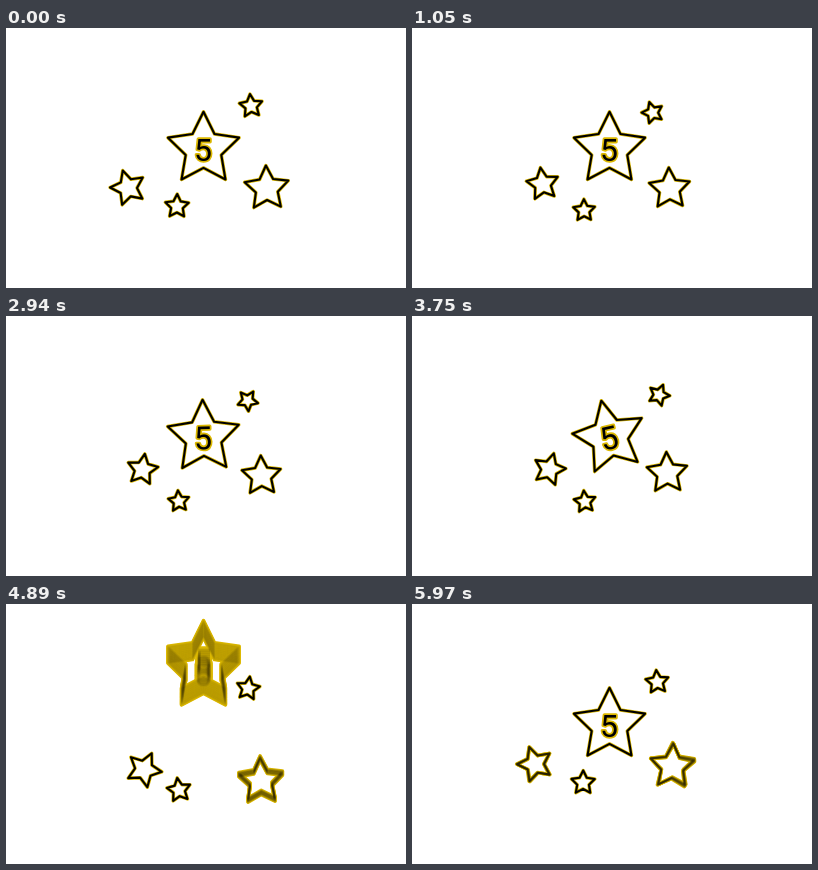
An HTML page with a canvas for the animation above (6 s loop, 400 px wide and 260 px high).

```html
<!DOCTYPE html>
<html>
<head>
<meta charset="utf-8">
<style>
html, body { margin: 0; width: 100%; height: 100%; overflow: hidden; background: #fff; }
canvas { display: block; }
</style>
</head>
<body>
<canvas id="stage" width="400" height="260"></canvas>
<script>
const ctx = document.getElementById('stage').getContext('2d');
const LOOP = 6000, SHUTTER = 30, GOLD = '#dcb800';
const JUMP = 4690, LANDED = 5700;
const { sin, cos, min, max, PI } = Math;

const clamp = u => max(0, min(1, u));
const smooth = u => u * u * (3 - 2 * u);
const progress = (t, from, length) => clamp((t - from) / length);

// Shared rhythms of the small stars
const settle = t => 1 - Math.exp(-t / 1400);
const wave = t => sin(3 * PI * t / LOOP) ** 2;
const homing = t => progress(t, 5040, 960) ** 2;
const swing = t => sin(2 * PI * progress(t, 1000, JUMP - 1000));

// drift: slow move away, sway: repeated swerve, drop: recoil from the jump,
// spin: steady turn, turn: extra turn on the way home
const smallStars = [
  { x: 245, y: 78, r: 12, rot: -5, drift: [3, 0], sway: [-6, 6.7], spin: -72 },
  { x: 122, y: 159.8, r: 18, rot: -17, drift: [16.5, -7], drop: 12.5, dropAt: 4500, spin: 52, turn: 20 },
  { x: 171, y: 178.3, r: 12.3, rot: 1, drift: [2, 8], spin: -11, turn: 11 },
  { x: 260.7, y: 160.5, r: 23, rot: -2, drift: [-6, 0], bob: 3.4, drop: 32, dropAt: 4738, turn: -72 }
];

function smallPose(star, t) {
  const { drift, sway = [0, 0], bob = 0, drop = 0, dropAt = 0, spin = 0, turn = 0 } = star;
  const home = homing(t), away = settle(t) * (1 - home);
  const fall = drop * smooth(progress(t, dropAt, 300)) * (1 - home);
  return {
    x: star.x + drift[0] * away + sway[0] * wave(t),
    y: star.y + drift[1] * away + sway[1] * wave(t) + bob * swing(t) + fall,
    r: star.r * (1 - 0.12 * max(0, sin(PI * t / 4890))),
    rot: star.rot + spin * t / LOOP + turn * home,
    scale: 1
  };
}

const bigStar = { x: 197.5, y: 121.2, r: 37.4, rot: 0, scale: 1 };

function jumpPose(t) {
  const up = max(0, (t - JUMP) / 200);
  const rot = 17 * progress(t, 1000, JUMP - 1000) * swing(t);
  return { ...bigStar, y: bigStar.y - 58 * up * up, rot };
}

function zoomPose(t) {
  const left = max(0, (LANDED - t) / 270);
  return { ...bigStar, rot: 7 * left - 29 * left * (1 - left), scale: 1 + 4.7 * left };
}

function starPath(r) {
  ctx.beginPath();
  for (let i = 0; i < 10; i++) {
    const a = (i / 5 - 0.5) * PI, d = i % 2 ? r * 0.5 : r;
    ctx.lineTo(d * cos(a), d * sin(a));
  }
  ctx.closePath();
}

function stroke(color, width) {
  ctx.strokeStyle = color;
  ctx.lineWidth = width;
  ctx.stroke();
}

// Sweeps a star over the shutter time: white body, gold rim, then thinned ink
function drawStar(pose, t, { body = false, label = false, ink = 1.3 } = {}) {
  const a = pose(t - SHUTTER / 2), b = pose(t + SHUTTER / 2);
  const travel = Math.hypot(b.x - a.x, b.y - a.y) +
    a.r * (Math.abs(b.scale - a.scale) + a.scale * Math.abs(b.rot - a.rot) * PI / 180);
  const n = travel < 1.3 ? 1 : min(40, Math.ceil(travel * 1.5));
  const pass = paint => {
    for (let i = 0; i < n; i++) {
      const p = pose(t + ((i + 0.5) / n - 0.5) * SHUTTER);
      ctx.save();
      ctx.translate(p.x, p.y);
      ctx.rotate(p.rot * PI / 180);
      ctx.scale(p.scale, p.scale);
      starPath(p.r);
      paint();
      ctx.restore();
    }
  };
  if (body) pass(() => { ctx.fillStyle = '#fff'; ctx.fill(); });
  pass(() => {
    stroke(GOLD, 3.5);
    if (label) ctx.strokeText('5', -0.5, 12);
  });
  ctx.globalAlpha = n === 1 ? 1 : min(1, ink / n);
  pass(() => {
    stroke('#000', 2.1);
    ctx.fillStyle = '#000';
    if (label) ctx.fillText('5', -0.5, 12);
  });
  ctx.globalAlpha = 1;
}

function draw(t) {
  ctx.fillStyle = '#fff';
  ctx.fillRect(0, 0, 400, 260);
  ctx.lineJoin = 'round';
  ctx.textAlign = 'center';
  ctx.font = '32px Roboto, "Liberation Sans", sans-serif';
  for (const star of smallStars) drawStar(time => smallPose(star, time), t);
  if (t < 5060) drawStar(jumpPose, t, { body: true, label: true });
  else drawStar(zoomPose, t, { body: true, label: t >= LANDED - SHUTTER, ink: 0.7 });
}

const start = performance.now();
function frame() {
  draw((performance.now() - start) % LOOP);
  requestAnimationFrame(frame);
}
frame();
</script>
</body>
</html>
```
